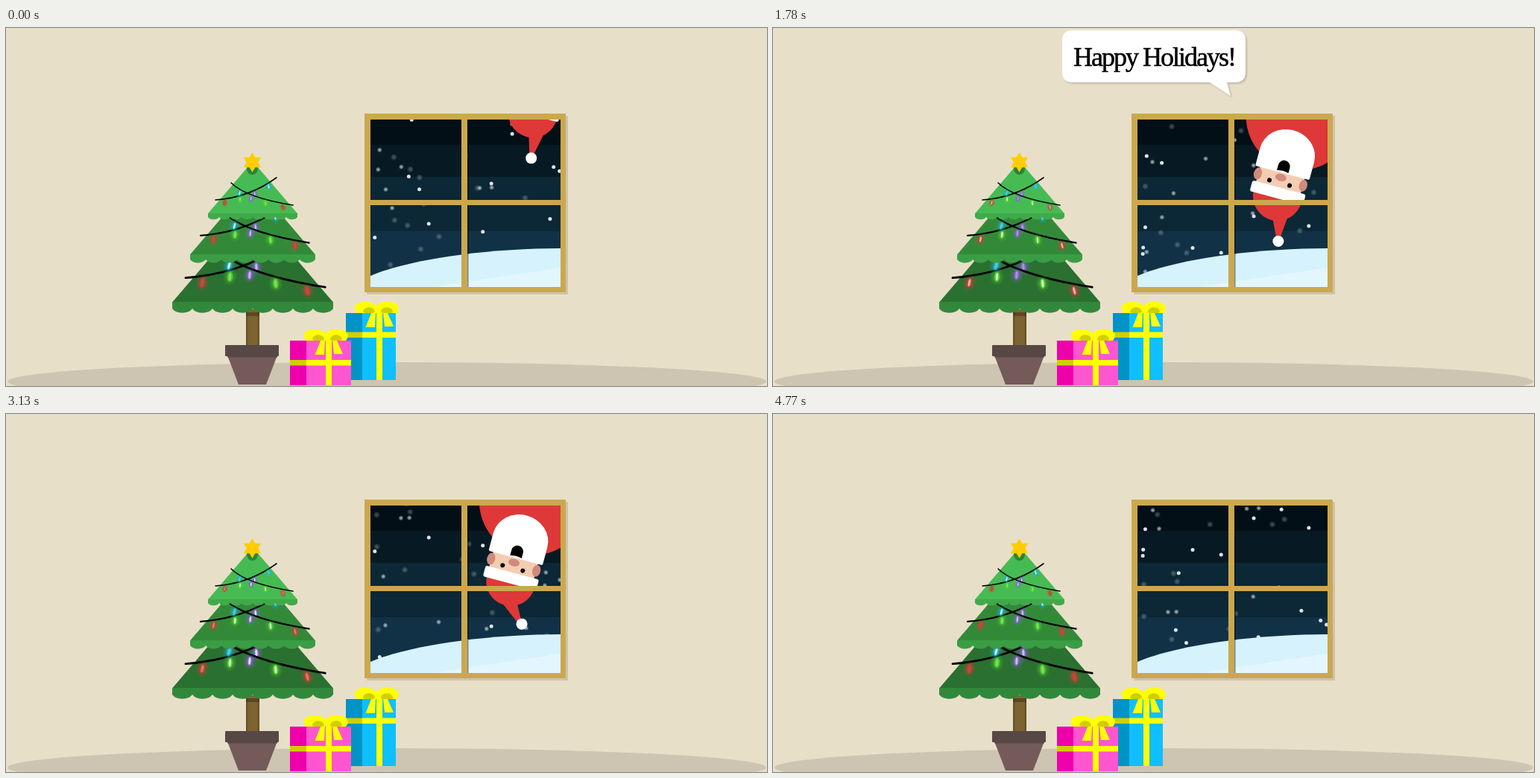
Write an HTML page that moves like this. It is 1021 px wide and 481 px high and loops after 4870 ms.

```html
<!DOCTYPE html>
<html lang="en">
<head>
<meta charset="utf-8">
<title>Happy Holidays</title>
<style>
  html, body { margin: 0; width: 100%; height: 100%; overflow: hidden; background: #e8dfc9; }
  svg { display: block; width: 100%; height: 100%; }
  #bubble { filter: drop-shadow(2px 2px 1px rgba(0, 0, 0, .16)); }
  #bubble text { font: 36px "Liberation Serif", "Noto Serif", serif; letter-spacing: -2px; stroke: #000; stroke-width: .5px; }
</style>
</head>
<body>
<svg id="stage" viewBox="0 0 1021 481"></svg>
<script>
const LOOP = 4870;
const SNOW_WRAP = 455;
const FLAKES_PER_LAYER = 26;

// Each bulb colour glints around a mean level and is brightest at its own point of the loop.
const BULBS = {
  red: { color: '#cf3d36', mean: .3, peak: .4 },
  green: { color: '#55d62a', mean: .6, peak: .5 },
  purple: { color: '#8a62d6', mean: .55, peak: .75 },
  cyan: { color: '#1fb4d8', mean: .5, peak: 0 }
};

// Speed in pixels per millisecond.
const SNOW = [
  { speed: .057, r: 4.6, fill: 'url(#haze)', opacity: .3 },
  { speed: .077, r: 3.6, fill: 'url(#haze)', opacity: .75 },
  { speed: .1144, r: 2.5, fill: '#eef5f8', opacity: .92 }
];

const ramp = (t, from, to) => Math.max(0, Math.min(1, (t - from) / (to - from)));
const wave = turns => Math.cos(2 * Math.PI * turns);

function seeded(seed) {
  return () => (seed = seed * 16807 % 2147483647) / 2147483647;
}

const rect = (x, y, w, h, fill, extra = '') =>
  `<rect x="${x}" y="${y}" width="${w}" height="${h}" fill="${fill}" ${extra}/>`;
const oval = (x, y, rx, ry, fill, extra = '') =>
  `<ellipse cx="${x}" cy="${y}" rx="${rx}" ry="${ry}" fill="${fill}" ${extra}/>`;
const path = (d, fill, extra = '') => `<path d="${d}" fill="${fill}" ${extra}/>`;

function radial(id, color) {
  return `<radialGradient id="${id}"><stop offset="0" stop-color="${color}"/>
    <stop offset=".45" stop-color="${color}" stop-opacity=".7"/>
    <stop offset="1" stop-color="${color}" stop-opacity="0"/></radialGradient>`;
}

function bulb(name, x, y, tilt) {
  return `<g transform="translate(${x} ${y}) rotate(${tilt})">
    ${oval(0, 0, 5.4, 6.8, `url(#glow-${name})`, 'opacity=".5"')}
    ${oval(0, 0, 2.1, 3.8, BULBS[name].color, 'opacity=".8"')}
    ${oval(0, 0, .9, 2.8, '#fff', `class="shine ${name}"`)}</g>`;
}

// A quadratic wire with evenly spaced bulbs hanging just below it.
function garland([x0, y0], [x1, y1], [x2, y2], names, first, step, tilt) {
  const at = (a, b, c, p) => (1 - p) ** 2 * a + 2 * p * (1 - p) * b + p * p * c;
  const bulbs = names.map((name, i) => {
    const p = first + step * i;
    return bulb(name, at(x0, x1, x2, p), at(y0, y1, y2, p) + 5, tilt * (1.5 - i));
  });
  return path(`M${x0} ${y0}Q${x1} ${y1} ${x2} ${y2}`, 'none',
    'stroke="#000" stroke-width="1.6" stroke-linecap="round"') + bulbs.join('');
}

function tier(base, scale, fill, hem) {
  const names = Object.keys(BULBS);
  const scallops = 'a8.5 6 0 0 1 -15 0'.repeat(8);
  return `<g transform="translate(331 ${base}) scale(${scale})">
    ${path('M0 -70L60 .3H-60Z', fill)}
    ${path(`M-60 0H60V5${scallops}Z`, hem)}
    ${garland([-50, -18], [-5, -21], [32, -48], names, .14, .24, 8)}
    ${garland([-29, -41], [-9, -21], [54, -11], names.reverse(), .23, .22, 10)}</g>`;
}

function star(x, y) {
  const points = Array.from({ length: 12 }, (_, i) => {
    const r = i % 2 ? 7.8 : 13.3, a = Math.PI * i / 6;
    return `${x + r * Math.sin(a)},${y - r * Math.cos(a)}`;
  });
  return `<polygon points="${points.join(' ')}" fill="#ffcd00"/>`;
}

function tree() {
  return rect(322, 378, 18, 50, 'url(#bark)')
    + rect(322, 382, 18, 5, '#3a2c12', 'opacity=".5"')
    + path('M297 440H364L349 479H312Z', '#745a59')
    + rect(297, 440, 67, 2.5, '#4f3f3e', 'opacity=".7"')
    + rect(294, 426, 72, 15, '#574745', 'rx="1"')
    + tier(368, 1.8, '#2a7030', '#32883a')
    + tier(304, 1.4, '#328a39', '#3a9d44')
    + tier(249, 1, '#46bb53', '#40aa4b')
    + oval(330.5, 189, 7.5, 8, '#2b8436')
    + star(330.5, 180.5);
}

function gift(left, front, right, top, bottom, ribbon, band, side, face) {
  const h = bottom - top, yellow = '#ffff00', olive = '#cfcf00';
  return rect(left, top, front - left, h, side) + rect(front, top, right - front, h, face)
    + rect(left, band, front - left, 7.5, olive) + rect(front, band, right - front, 7.5, yellow)
    + rect(ribbon - 4, top, 8, h, yellow)
    + `<g transform="translate(${ribbon} ${top})">
      ${path('M-11 0H-5L-6 19H-18.5ZM5 0H11L19 18H7Z', yellow)}
      ${path('M-30 0C-38 -9 -30 -15 -20 -15C-11 -15 -6 -13 -4 -9C0 -15 6 -16 13 -15C23 -15 30 -8 23 0Z', yellow)}
      ${path('M-22 -1C-22 -10 -6 -10 -6 -1L-9 0H-19ZM2 -1C2 -10 18 -10 18 -1L15 0H5Z', olive)}</g>`;
}

// Two stacked copies of the flakes let the layer wrap without a gap.
function snowLayer({ r, fill, opacity }, index) {
  const random = seeded(4211 + 977 * index);
  let flakes = '';
  for (let i = 0; i < FLAKES_PER_LAYER; i++) {
    const x = 489 + 255 * random(), y = SNOW_WRAP * random();
    flakes += oval(x, y, r, r, fill) + oval(x, y - SNOW_WRAP, r, r, fill);
  }
  return `<g class="snow" opacity="${opacity}">${flakes}</g>`;
}

function santa() {
  const red = '#de3838', skin = '#f3cdb2', blush = '#d08a7e';
  return `<g id="santa"><g transform="rotate(15)">
    ${oval(1, -111, 72, 72, red)}
    ${rect(-33, -36, 62, 28, skin)}
    ${path('M-39.5 -34V-57A37.5 34 0 0 1 35.5 -57V-34Q35.5 -32 33.5 -32H-37.5Q-39.5 -32 -39.5 -34Z', '#fff')}
    ${path('M-10 -33.5V-41A8 8 0 0 1 6 -41V-33.5Q-2 -36 -10 -33.5Z', '#000')}
    ${[-33.5, 29.5].map(x => oval(x, -22.5, 5.5, 8, blush)).join('')}
    ${oval(-2.4, -25.5, 7.6, 5, blush)}
    ${[-16.2, 11.8].map(x => oval(x, -18, 3, 3, '#000')).join('')}
    ${path('M-33 -2H33V0A33 33 0 0 1 -33 0Z', red)}</g>
    <polygon id="tail" fill="${red}"/>
    <g transform="rotate(15)">${rect(-38, -12, 74, 15, '#fff', 'rx="3"')}</g>
    <circle id="pom" r="7.5" fill="#fff"/></g>`;
}

function windowView() {
  const wood = '#cba84f';
  return rect(484, 118, 270, 240, '#9a8f78', 'opacity=".35" rx="1"')
    + '<g clip-path="url(#pane)">'
    + rect(489, 123, 255, 34, '#030f16') + rect(489, 157, 255, 43, '#071a23')
    + rect(489, 200, 255, 73, '#0c2735') + rect(489, 273, 255, 75, '#113146')
    + SNOW.map(snowLayer).join('')
    + path('M489 333C540 311 645 296 744 296V348H489Z', '#d6f2fd')
    + path('M572 348L744 322V348Z', '#e4f6fd')
    + santa()
    + rect(619, 123, 1.5, 225, '#000', 'opacity=".45"') + '</g>'
    + path('M481 115H751V355H481ZM489 123V348H744V123Z', wood, 'fill-rule="evenodd"')
    + rect(611, 123, 8, 225, wood) + rect(489, 231, 255, 7, wood);
}

function bubble() {
  return `<g id="bubble">
    ${path('M402 3H620Q634 3 634 17V59Q634 73 620 73H609L614 91.5L586 73H402Q388 73 388 59V17Q388 3 402 3Z', '#fff')}
    <text x="403" y="51">Happy Holidays!</text></g>`;
}

const stage = document.getElementById('stage');
stage.innerHTML = `<defs>
    <clipPath id="pane"><rect x="489" y="123" width="255" height="225"/></clipPath>
    <linearGradient id="bark"><stop offset="0" stop-color="#624c22"/><stop offset=".2" stop-color="#7c6331"/>
      <stop offset=".8" stop-color="#7c6331"/><stop offset="1" stop-color="#624c22"/></linearGradient>
    ${radial('haze', '#dfe9ee')}
    ${Object.keys(BULBS).map(name => radial(`glow-${name}`, BULBS[name].color)).join('')}
  </defs>`
  + rect(0, 0, 1021, 481, '#e8dfc9')
  + oval(511, 475, 509, 26, '#cdc4b1')
  + tree() + windowView()
  + gift(456, 478, 523, 383, 473, 501, 408.5, '#0093c6', '#10bfff')
  + gift(381, 403, 463, 420, 480, 433, 446, '#ee00aa', '#ff55cf')
  + bubble();

const find = id => document.getElementById(id);
const santaNode = find('santa'), tail = find('tail'), pom = find('pom'), bubbleNode = find('bubble');
const snowNodes = [...stage.querySelectorAll('.snow')];
const shineNodes = Object.keys(BULBS).map(name => [BULBS[name], [...stage.querySelectorAll(`.shine.${name}`)]]);

// Distance Santa is pulled back up along his own tilted axis: eases in, waits, speeds away.
function retreat(t) {
  return 115.5 * (1 - ramp(t, 0, 1010)) ** 2 + 300 * ramp(t, 3020, 4797) ** 2;
}

function draw(t) {
  const s = retreat(t), swing = 6 - 9 * wave((t - 130) / 1950), base = 3.5 - .35 * swing;
  santaNode.setAttribute('transform', `translate(${677 + .259 * s} ${226 - .966 * s})`);
  tail.setAttribute('points', `${base - 10},29 ${base + 10},29 ${swing + 1},60 ${swing - 2},60`);
  pom.setAttribute('cx', swing);
  pom.setAttribute('cy', 60.5 - .015 * swing * swing);

  const shown = ramp(t, 304, 1440) - ramp(t, 2430, 3080);
  bubbleNode.setAttribute('opacity', shown);
  bubbleNode.setAttribute('transform', `translate(0 ${11.5 * (1 - shown)})`);

  snowNodes.forEach((node, i) =>
    node.setAttribute('transform', `translate(0 ${SNOW[i].speed * t % SNOW_WRAP})`));
  for (const [{ mean, peak }, nodes] of shineNodes) {
    const level = mean + .3 * wave(t / LOOP - peak);
    nodes.forEach(node => node.setAttribute('opacity', level));
  }
}

// The picture holds for about 150 ms, with three slightly shorter beats.
function held(ms) {
  const lag = 10 * ((ms >= 440) + (ms >= 1030) + (ms >= 4470));
  return Math.floor((ms + lag) / 150) * 150 - lag;
}

const start = performance.now();
function tick() {
  draw(held(Math.max(0, performance.now() - start) % LOOP));
  requestAnimationFrame(tick);
}
tick();
</script>
</body>
</html>
```
